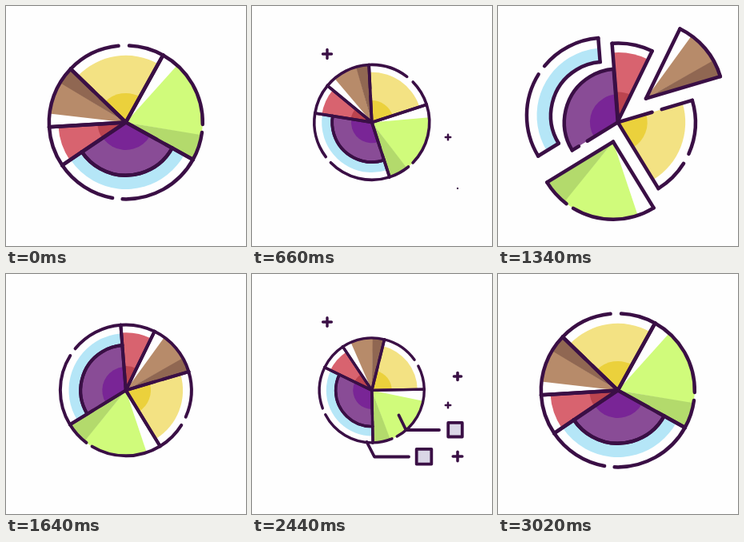
An HTML page with a canvas that plays this animation: 300 by 300 pixels, repeating every 3040 ms.

```html
<!DOCTYPE html>
<html lang="en">
<head>
<meta charset="utf-8">
<title>Pie chart</title>
<style>
html, body { margin: 0; width: 100%; height: 100%; overflow: hidden; background: #fefefe; }
canvas { display: block; width: 100vmin; height: 100vmin; margin: auto; }
</style>
</head>
<body>
<canvas id="stage" width="300" height="300"></canvas>
<script>
const LOOP = 3040, CX = 149.8, CY = 145.4;
const INK = '#3a0f45', RAD = Math.PI / 180;
const ctx = document.getElementById('stage').getContext('2d');

// Smooth monotone curve through [time, value] keys, flat at turning points.
function track(keys) {
  const slope = (i) => (keys[i + 1][1] - keys[i][1]) / (keys[i + 1][0] - keys[i][0]);
  const tangents = keys.map((_, i) => {
    if (i === 0 || i === keys.length - 1) return 0;
    const a = slope(i - 1), b = slope(i);
    return a * b <= 0 ? 0 : 2 * a * b / (a + b);
  });
  return (t) => {
    if (t <= keys[0][0]) return keys[0][1];
    let i = 0;
    while (i < keys.length - 1 && t > keys[i + 1][0]) i++;
    if (i === keys.length - 1) return keys[i][1];
    const [t0, v0] = keys[i], [t1, v1] = keys[i + 1];
    const d = t1 - t0, u = (t - t0) / d, u2 = u * u, u3 = u2 * u;
    return v0 * (2 * u3 - 3 * u2 + 1) + v1 * (3 * u2 - 2 * u3)
      + d * tangents[i] * (u3 - 2 * u2 + u) + d * tangents[i + 1] * (u3 - u2);
  };
}

const still = () => 0;
const pulse = (a, b, c, d, top = 1) => track([[a, 0], [b, top], [c, top], [d, 0]]);

const spin = track([[0, 0], [660, 43], [960, 81], [1340, 119.5], [2040, 119.5], [2440, 60], [2960, 0]]);
const radius = track([[60, 96], [660, 72], [830, 67], [960, 69], [1290, 97], [1400, 97],
  [1640, 82], [1760, 77.5], [2160, 77.5], [2440, 65.5], [2700, 78], [2990, 96]]);

// fills: [colour, outer radius, start, end, inner radius]; angles relative to the slice start
const slices = [
  { from: 224, to: 299, out: still, gaps: [[264.5, 272.5]], notch: true,
    fills: [['#f3e283', 0.87, 0, 75], ['#ebd13c', 0.38, 0, 75]] },
  { from: 29, to: 146, out: still, gaps: [], notch: true, size: 0.69,
    fills: [['#894c96', 0.69, 0, 117], ['#792596', 0.36, 0, 117]] },
  { from: 29, to: 146, gaps: [[92.5, 100]], hole: 0.69,
    out: track([[960, 0], [1080, 16], [1220, 23], [1340, 19], [1580, 0]]),
    fills: [['#b5e6f7', 0.87, 0, 117, 0.69]] },
  { from: 146, to: 176.5, gaps: [],
    out: track([[880, 0], [960, 12], [1150, 34], [1340, 2], [1420, 0]]),
    fills: [['#d8636f', 0.88, 0, 30.5], ['#bb444f', 0.37, 0, 30.5]] },
  { from: 299, to: 389, gaps: [[361.5, 367.5]], out: pulse(1060, 1320, 1360, 1600, 25),
    fills: [['#d0fb7b', 1, 13, 71], ['#b3da6c', 1, 70.5, 90]] },
  { from: 176.5, to: 224, gaps: [], out: pulse(1100, 1330, 1400, 1640, 46),
    fills: [['#b78b6a', 1, 10, 35], ['#906752', 1, 34.5, 47.5]] }
];

const pluses = [
  [94, 60, 5.5, [540, 640, 760, 990]],
  [245, 164, 3.2, [560, 650, 980, 1070]],
  [257, 228, 5.8, [640, 780, 980, 1080]],
  [257, 128, 6, [680, 830, 980, 1090]]
].map(([x, y, size, beat]) => ({
  x, y, size, first: pulse(...beat), second: pulse(...beat.map((b) => b + 1660))
}));

const callouts = [
  { points: [[183.5, 176.5], [192.5, 195], [234, 195]], box: [254, 194.7], delay: 0 },
  { points: [[143.5, 210], [153, 228.5], [196, 228.5]], box: [215, 228.2], delay: 30 }
];
const reach = pulse(1640, 1850, 2500, 2690);
const pop = track([[1770, 0], [1920, 1], [2340, 1], [2440, 0.88], [2620, 0]]);

const polar = (r, a) => [r * Math.cos(a * RAD), r * Math.sin(a * RAD)];

function line(...points) {
  ctx.beginPath();
  points.forEach((p) => ctx.lineTo(...p));
  ctx.stroke();
}

function arc(r, a, b) {
  ctx.beginPath();
  ctx.arc(0, 0, r, a * RAD, b * RAD);
  ctx.stroke();
}

function inSlice(s, t, draw) {
  const a = spin(t);
  const [dx, dy] = polar(s.out(t), (s.from + s.to) / 2 + a);
  ctx.save();
  ctx.translate(CX + dx, CY + dy);
  ctx.rotate(a * RAD);
  draw(s, radius(t));
  ctx.restore();
}

function fillSlice(s, r) {
  for (const [color, outer, a, b, inner = 0] of s.fills) {
    const a0 = (s.from + a) * RAD, a1 = (s.from + b) * RAD;
    ctx.fillStyle = color;
    ctx.beginPath();
    ctx.arc(0, 0, r * outer, a0, a1);
    if (inner) ctx.arc(0, 0, r * inner, a1, a0, true);
    else ctx.lineTo(0, 0);
    ctx.fill();
  }
}

function outline(s, r) {
  const outer = r * (s.size || 1), inner = r * (s.hole || 0);
  ctx.lineWidth = 1.2 + 0.034 * r;
  if (s.notch) {
    line([0, 0], polar(r * 0.46, s.from));
    line(polar(r * 0.59, s.from), polar(outer, s.from));
  } else {
    line(polar(inner, s.from), polar(outer, s.from));
  }
  line(polar(inner, s.to), polar(outer, s.to));
  if (inner) arc(inner, s.from, s.to);
  let a = s.from;
  for (const [g0, g1] of s.gaps) {
    arc(outer, a, g0);
    a = g1;
  }
  arc(outer, a, s.to);
}

function drawPlus(p, t) {
  const k = p.first(t) + p.second(t);
  if (k < 0.02) return;
  const h = p.size * k;
  ctx.lineWidth = (1.2 + p.size * 0.4) * Math.min(1, 0.4 + k);
  line([p.x - h, p.y], [p.x + h, p.y]);
  line([p.x, p.y - h], [p.x, p.y + h]);
}

function drawCallout(c, t) {
  const k = reach(t - c.delay), size = 20 * pop(t - c.delay);
  const [a, b, end] = c.points;
  ctx.lineWidth = 3.8;
  if (k > 0.01) {
    const bend = 0.33, mix = (p, q, u) => [p[0] + (q[0] - p[0]) * u, p[1] + (q[1] - p[1]) * u];
    if (k < bend) line(a, mix(a, b, k / bend));
    else line(a, b, mix(b, end, (k - bend) / (1 - bend)));
  }
  if (size > 0.5) {
    ctx.lineWidth = Math.min(3.8, size / 3);
    ctx.fillStyle = '#dad6e6';
    ctx.beginPath();
    ctx.rect(c.box[0] - size / 2, c.box[1] - size / 2, size, size);
    ctx.fill();
    ctx.stroke();
  }
}

function draw(t) {
  ctx.fillStyle = '#fefefe';
  ctx.fillRect(0, 0, 300, 300);
  ctx.strokeStyle = INK;
  ctx.lineCap = ctx.lineJoin = 'round';
  slices.forEach((s) => inSlice(s, t, fillSlice));
  slices.forEach((s) => inSlice(s, t, outline));
  callouts.forEach((c) => drawCallout(c, t));
  pluses.forEach((p) => drawPlus(p, t));
}

const start = performance.now();
function tick() {
  draw((performance.now() - start) % LOOP);
  requestAnimationFrame(tick);
}
tick();
</script>
</body>
</html>
```
